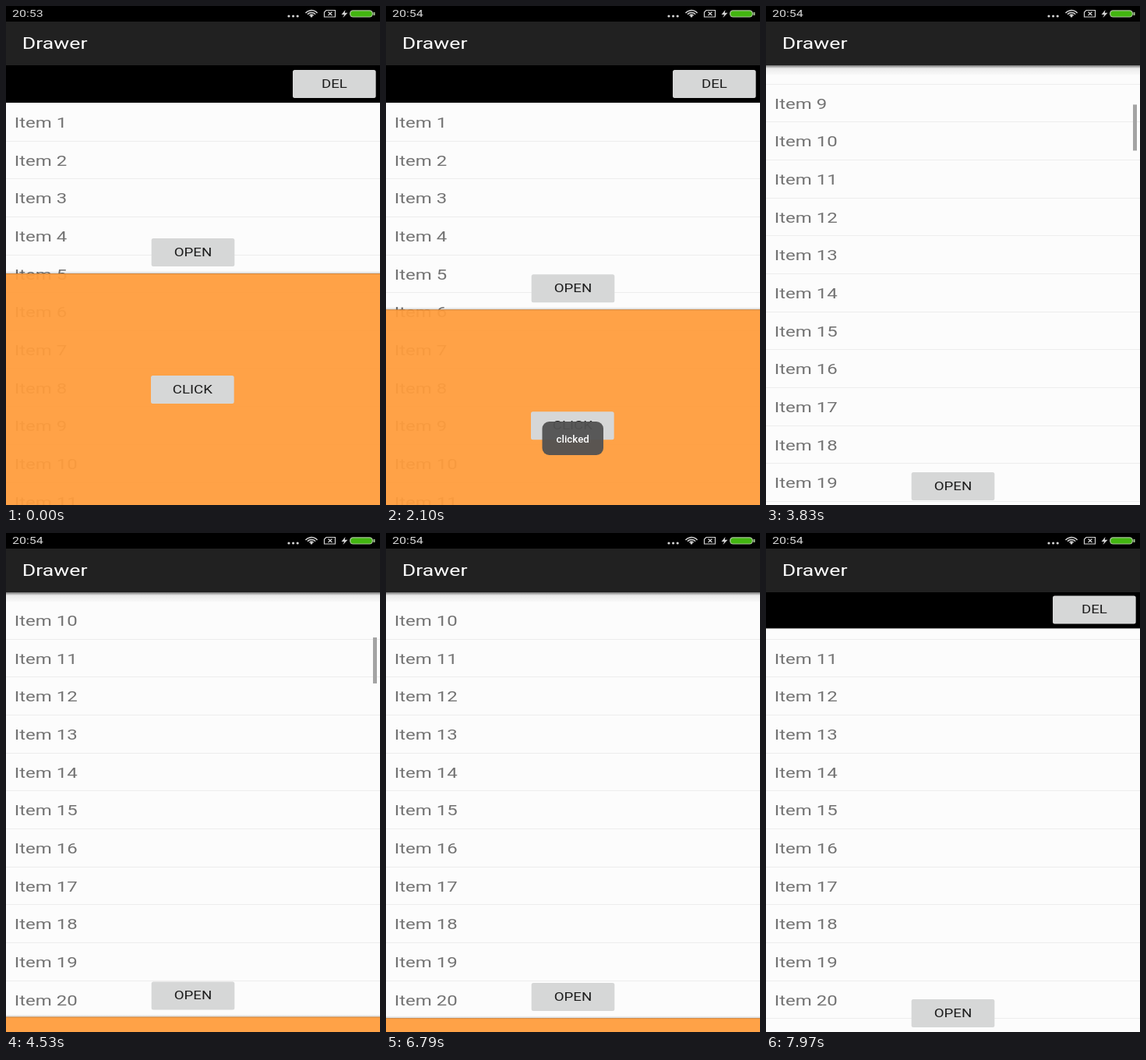
Recreate the animation shown at these times as an HTML page with a canvas. Size 480 by 640 pixels, loop 7990 ms.

```html
<!DOCTYPE html>
<html lang="en">
<head>
<meta charset="utf-8">
<title>Drawer</title>
<style>
  html, body { margin: 0; width: 100%; height: 100%; overflow: hidden; background: #000; }
  canvas { display: block; width: 480px; height: 640px; }
</style>
</head>
<body>
<canvas id="stage" width="480" height="640"></canvas>
<script>
const ctx = document.getElementById('stage').getContext('2d');

const LOOP = 7990;
const DP = 4 / 3;            // the 360 x 640 screen is shown 480 wide
const HEADER = 76;
const ROW = 48.667;
const SCROLL_END = 475;
const SLIDE = 300;           // drawer first, top panel right after it

const moves = [
  { start: 2024, shown: 2024, open: false },
  { start: 4478, shown: 4525, open: true },
  { start: 5830, shown: 5830, open: false },
  { start: 6740, shown: 6785, open: true },
  { start: 7636, shown: 7655, open: false },
];

const clamp = x => Math.min(1, Math.max(0, x));
const ramp = (t, from, to) => clamp((t - from) / (to - from));
const ease = p => (1 - Math.cos(Math.PI * p)) / 2;

function openness(t, delay) {
  let value = 1;
  for (const m of moves) {
    if (t < m.shown) break;
    const p = ease(clamp((t - m.start - delay) / SLIDE));
    value = m.open ? p : 1 - p;
  }
  return value;
}

function scrollAt(t) {
  const p = ramp(t, 3190, 4250);
  return SCROLL_END * (1 - Math.pow(1 - Math.pow(p, 1.4), 3));
}

function rect(x, y, w, h, color) {
  ctx.fillStyle = color;
  ctx.fillRect(x, y, w, h);
}

function rounded(x, y, w, h, r, color) {
  ctx.fillStyle = color;
  ctx.beginPath();
  ctx.roundRect(x, y, w, h, r);
  ctx.fill();
}

function fade(y, h, from, to) {
  const g = ctx.createLinearGradient(0, y, 0, y + h);
  g.addColorStop(0, from);
  g.addColorStop(1, to);
  rect(0, y, 480, h, g);
}

function label(text, x, y, font, color, align = 'left') {
  ctx.font = font + ' Roboto, sans-serif';
  ctx.fillStyle = color;
  ctx.textAlign = align;
  ctx.fillText(text, x, y);
}

// Screen text lives in dp space, like the rest of the phone layout.
function dpLabel(text, x, y, font, color, align) {
  ctx.save();
  ctx.scale(DP, 1);
  label(text, x, y, font, color, align);
  ctx.restore();
}

function button(text, x, y, pressed = 0) {
  rounded(x * DP, y, 80 * DP, 36, 2.5, '#d6d7d7');
  if (pressed > 0) {
    ctx.globalAlpha = pressed;
    rounded(x * DP, y, 80 * DP, 36, 2.5, '#b6b6b6');
    ctx.globalAlpha = 1;
  }
  dpLabel(text, x + 40, y + 23, '400 14px', '#1c1c1c', 'center');
}

function drawList(t) {
  const scroll = scrollAt(t);
  rect(0, HEADER, 480, 640 - HEADER, '#fcfcfc');
  const first = Math.floor(scroll / ROW);
  for (let k = first; k < first + 13; k++) {
    const y = HEADER + k * ROW - scroll;
    dpLabel('Item ' + k, 8, y + 31.3, '400 18px', '#737373');
    rect(0, Math.round(y + 48), 480, 1, '#ededed');
  }
  const bar = ramp(t, 3190, 3230) * (1 - ramp(t, 4550, 4800));
  if (bar > 0) {
    ctx.globalAlpha = bar;
    rect(471, HEADER + scroll * 0.122, 5, 59, '#a4a4a4');
    ctx.globalAlpha = 1;
  }
  fade(HEADER, 12, '#e4e4e4', '#f8f8f8');
  fade(HEADER, 4, 'rgba(0,0,0,.5)', 'rgba(0,0,0,0)');
}

function drawDrawer(t, top) {
  rect(0, top, 480, 300, 'rgba(255,157,60,.94)');
  fade(top - 3, 4, 'rgba(0,0,0,0)', 'rgba(0,0,0,.2)');
  button('CLICK', 139.5, top + 131, ramp(t, 1025, 1060) * (1 - ramp(t, 1200, 1500)));
}

function drawStatus(t) {
  const ink = '#d4d4d4';
  rect(0, 0, 480, 20, '#000');
  dpLabel(t < 1200 ? '20:53' : '20:54', 6, 14.2, '400 12px', ink);

  ctx.fillStyle = ctx.strokeStyle = ink;
  for (let i = 0; i < 3; i++) {
    ctx.beginPath();
    ctx.arc(363 + i * 5.6, 13, 1.6, 0, 7);
    ctx.fill();
  }

  ctx.lineWidth = 1.5;
  for (let i = 1; i < 4; i++) {
    ctx.beginPath();
    ctx.ellipse(392, 14, i * 3.1, i * 2.8, 0, -Math.PI * 0.8, -Math.PI * 0.2);
    ctx.stroke();
  }
  ctx.beginPath();
  ctx.arc(392, 13, 1.5, 0, 7);
  ctx.fill();

  ctx.lineWidth = 1.2;
  ctx.stroke(new Path2D('M411 5.5H422.5V14H408.5V8ZM413.5 7.5L418.5 12M418.5 7.5L413.5 12'));
  ctx.fill(new Path2D('M435.5 5L430.5 11H434L432.5 15L438.5 8.8H434.8Z'));

  rounded(441, 5.3, 30, 9.2, 4.5, '#a9c49a');
  rounded(442.3, 6.4, 27.4, 7, 3.5, '#42b510');
  rect(471.5, 8, 2, 4, '#a9c49a');
}

function drawToast(t) {
  const alpha = ramp(t, 1250, 1650) * (1 - ramp(t, 3250, 3650));
  if (alpha <= 0) return;
  ctx.globalAlpha = alpha;
  rounded(200.5, 533, 78.5, 43, 9, 'rgba(82,82,82,.95)');
  label('clicked', 239.7, 559.5, '500 13.3px', '#fff', 'center');
  ctx.globalAlpha = 1;
}

function draw(t) {
  const drawerTop = 343 + 300 * (1 - openness(t, 0));
  const panelTop = HEADER - 48 * (1 - openness(t, SLIDE));

  drawList(t);
  drawDrawer(t, drawerTop);
  rect(0, panelTop, 480, 48, '#000');
  button('DEL', 276, panelTop + 6);
  button('OPEN', 140, drawerTop - 45, ramp(t, 5750, 5760) * (1 - ramp(t, 5820, 5960)));

  rect(0, 20, 480, HEADER - 20, '#212121');
  dpLabel('Drawer', 15.6, 55.3, '400 20px', '#fff');
  drawStatus(t);
  drawToast(t);
}

function tick() {
  draw(performance.now() % LOOP);
  requestAnimationFrame(tick);
}
tick();
</script>
</body>
</html>
```
